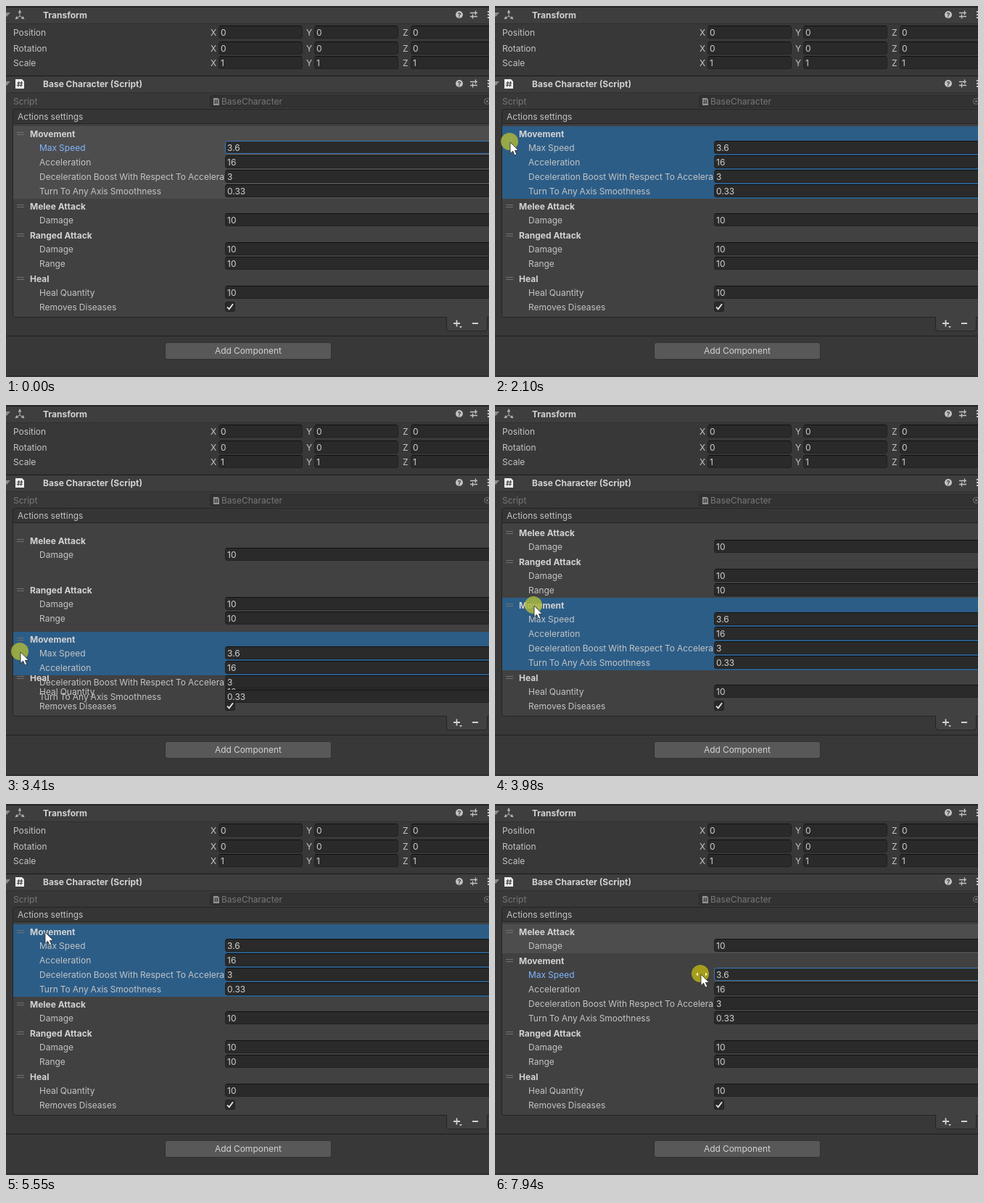
Animation, 666 px wide and 512 px high, one loop 7.99 s. Source, as an HTML page:

```html
<!DOCTYPE html>
<html lang="en">
<head>
<meta charset="utf-8">
<title>Reorderable list</title>
<style>
  html, body { margin: 0; width: 100%; height: 100%; overflow: hidden; background: #383838; }
  svg { display: block; font: 12px Inter, "Open Sans", sans-serif; word-spacing: -.4px; fill: #c4c4c4; user-select: none; }
  .bold { font-weight: 700; word-spacing: 0; fill: #d2d2d2; }
  .value { fill: #d2d2d2; }
  .dim { fill: #787878; }
  .field { fill: #2a2a2a; stroke: #212121; }
  .handle { fill: #717171; }
  .focus .label { fill: #81b4ff; }
  .focus .field { stroke: #3a79bb; }
  .focus .edge { display: none; }
</style>
</head>
<body>
<svg id="stage" width="666" height="512" viewBox="0 0 666 512"></svg>
<script>
const LOOP = 7990, STEP = 46.7, LIST_TOP = 166;
const BLUE = '#2c5d87', GRAY = '#4d4d4d';
const stage = document.getElementById('stage');

function add(parent, tag, attrs = {}, text = '') {
  const node = document.createElementNS('http://www.w3.org/2000/svg', tag);
  for (const key in attrs) node.setAttribute(key, attrs[key]);
  node.textContent = text;
  parent.append(node);
  return node;
}
const rect = (p, x, y, width, height, fill) => add(p, 'rect', { x, y, width, height, fill });
const path = (p, d, attrs) => add(p, 'path', { d, ...attrs });
const label = (p, x, y, text, cls = 'label') => add(p, 'text', { x, y, class: cls }, text);

function field(p, x, y, width, value) {
  add(p, 'rect', { x: x + .5, y: y + .5, width: width - 1, height: 17, rx: 2.5, class: 'field' });
  add(p, 'rect', { x: x + 2, y, width: width - 4, height: 1, fill: '#111', class: 'edge' });
  label(p, x + 3, y + 14, value, 'value');
}

function checkbox(p, x, y) {
  add(p, 'rect', { x: x + .5, y: y + .5, width: 13, height: 13, rx: 2.5, class: 'field' });
  path(p, `M${x + 3} ${y + 7.5}l2.7 2.8l5.3 -7`, { fill: 'none', stroke: '#e8e8e8', 'stroke-width': 1.8 });
}

function componentHeader(y, title) {
  rect(stage, 0, y, 666, 1, '#1a1a1a');
  rect(stage, 0, y + 1, 666, 22, '#3e3e3e');
  rect(stage, 0, y + 23, 666, 1, '#303030');
  path(stage, `M-4 ${y + 8}H6L1 ${y + 14}Z`, { fill: '#8a8a8a' });
  label(stage, 51, y + 16, title, 'bold');

  add(stage, 'circle', { cx: 625, cy: y + 11, r: 5, fill: '#c4c4c4' });
  add(stage, 'text', { x: 625, y: y + 14.5, 'text-anchor': 'middle',
    style: 'font-size:9px;font-weight:700;fill:#3e3e3e' }, '?');
  path(stage, `M640 ${y + 8.5}h10M640 ${y + 13.5}h10M647.5 ${y + 5.5}v6M643.5 ${y + 10.5}v6`,
    { stroke: '#c4c4c4', 'stroke-width': 1.3 });
  for (const dy of [6, 10, 14]) rect(stage, 664, y + dy, 2, 2, '#c4c4c4');
}

function drawPanel() {
  rect(stage, 0, 0, 666, 512, '#383838');

  componentHeader(1, 'Transform');
  path(stage, 'M19 14V8M19 14L14 17M19 14L24 17', { stroke: '#9a9a9a', 'stroke-width': 1.2 });
  path(stage, 'M19 5l2.3 4.5h-4.6ZM12.5 18.2l2-4.2l2.6 3.6ZM25.5 18.2l-2-4.2l-2.6 3.6Z', { fill: '#b4b4b4' });
  [['Position', 27, 0], ['Rotation', 49, 0], ['Scale', 69, 1]].forEach(([name, y, value]) => {
    label(stage, 10, y + 14, name);
    ['X', 'Y', 'Z'].forEach((axis, i) => {
      const x = [293, 425, 558][i];
      label(stage, x - 11, y + 14, axis);
      field(stage, x, y, 116, value);
    });
  });

  componentHeader(96, 'Base Character (Script)');
  path(stage, 'M13 101h9l3 3v10h-12Z', { fill: '#eee' });
  path(stage, 'M17.8 104l-1 7.5M21.5 104l-1 7.5M15.2 106.3h8M14.8 109.3h8', { stroke: '#333', 'stroke-width': 1.1 });
  label(stage, 10, 136, 'Script', 'dim');
  add(stage, 'rect', { x: 281.5, y: 123.5, width: 400, height: 16, rx: 2.5, fill: '#323232', stroke: '#2b2b2b' });
  path(stage, 'M286 127h6l2 2v8h-8Z', { fill: '#929292' });
  path(stage, 'M289 129l-.6 6M291.6 129l-.6 6M287 131h6M287 133.5h6', { stroke: '#333', 'stroke-width': .8 });
  label(stage, 297, 136, 'BaseCharacter', 'dim');
  add(stage, 'circle', { cx: 663.5, cy: 131.5, r: 4, fill: 'none', stroke: '#777' });
  add(stage, 'circle', { cx: 663.5, cy: 131.5, r: 1.5, fill: '#777' });

  const line = { stroke: '#242424' };
  path(stage, 'M607.5 429V445Q607.5 448.5 611 448.5H660Q663.5 448.5 663.5 445V429', { fill: '#414141', ...line });
  path(stage, 'M670 162.5H9.5V426.5Q9.5 429.5 12.5 429.5H670', { fill: '#414141', ...line });
  rect(stage, 608, 429, 55, 1, '#414141');
  path(stage, 'M670 162.5H9.5V145.5Q9.5 142.5 12.5 142.5H670', { fill: '#353535', ...line });
  label(stage, 16, 157, 'Actions settings');
  path(stage, 'M617 438h9M621.5 433.5v9M643 438h8', { stroke: '#d0d0d0', 'stroke-width': 1.8 });
  path(stage, 'M625 442h4l-2 2.5Z', { fill: '#d0d0d0' });

  rect(stage, 0, 455, 666, 1, '#1f1f1f');
  add(stage, 'rect', { x: 219.5, y: 464.5, width: 229, height: 23, rx: 3, fill: '#585858', stroke: '#303030' });
  add(stage, 'text', { x: 334, y: 480, 'text-anchor': 'middle', class: 'value' }, 'Add Component');
  rect(stage, 0, 510, 666, 1, '#2b2b2b');

  const labelColumn = add(stage, 'clipPath', { id: 'label-column' });
  rect(labelColumn, 0, 0, 301, 512);
}

function makeItem(title, rows) {
  const group = add(list, 'g');
  const height = 20 + rows.length * 20;
  const box = rect(group, 10, 0, 656, height, 'none');
  const handle = path(group, 'M15 8h10v1h-10ZM15 11h10v1h-10Z', { class: 'handle' });
  label(group, 33, 15, title, 'bold');
  const rowNodes = rows.map(([name, value], i) => {
    const row = add(group, 'g'), y = 20 + i * 20;
    label(row, 46, y + 14, name).setAttribute('clip-path', 'url(#label-column)');
    if (value === true) checkbox(row, 302, y + 2);
    else field(row, 302, y, 370, value);
    return row;
  });
  return { group, box, handle, height, rowNodes };
}

drawPanel();
const list = add(stage, 'g');
const melee = makeItem('Melee Attack', [['Damage', 10]]);
const ranged = makeItem('Ranged Attack', [['Damage', 10], ['Range', 10]]);
const heal = makeItem('Heal', [['Heal Quantity', 10], ['Removes Diseases', true]]);
const movement = makeItem('Movement', [
  ['Max Speed', 3.6], ['Acceleration', 16],
  ['Deceleration Boost With Respect To Acceleration', 3], ['Turn To Any Axis Smoothness', 0.33]]);

const pointer = add(stage, 'g');
const halo = add(pointer, 'circle', { cx: -1, cy: -1, r: 12, 'fill-opacity': .8 });
const slider = path(pointer, 'M-7 0l3 -2.6v5.2ZM9 0l-3 -2.6v5.2Z', { fill: '#fff6b0' });
path(pointer, 'M0 0V15.5L3.6 12.2L6 18L8.8 16.8L6.4 11.3H11.2Z',
  { fill: '#fff', stroke: '#222', 'stroke-width': .8 });

// Pointer path: time, x, y.
const track = [
  [520, 97, 516], [800, 70, 400], [1100, 32, 230], [1320, 24, 190], [1910, 24, 190],
  [1960, 21, 188], [2580, 21, 188], [2900, 21, 208], [3200, 21, 285], [3363, 20, 334],
  [3410, 20, 341], [3560, 14, 348], [3700, 14, 345], [3920, 54, 277], [4020, 54, 277],
  [4303, 55, 206], [4350, 55, 204], [4700, 54, 177], [5700, 54, 177], [5980, 38, 279],
  [6090, 38, 279], [6300, 15, 276], [6640, 15, 276], [6863, 40, 203], [6920, 41, 202],
  [7300, 40, 166], [7460, 40, 166], [7800, 284, 235]];

function pointerAt(t) {
  const i = track.findIndex(key => key[0] > t);
  if (i < 0) return track[track.length - 1].slice(1);
  if (i === 0) return track[0].slice(1);
  const [t0, x0, y0] = track[i - 1], [t1, x1, y1] = track[i];
  const k = (t - t0) / (t1 - t0);
  return [x0 + (x1 - x0) * k, y0 + (y1 - y0) * k];
}

const between = (t, a, b) => t >= a && t < b;

// Items give way with an exponential approach to each new slot.
const slide = (t, start, moves) => moves.reduce(
  (top, [at, to]) => t < at ? top : to + (top - to) * Math.exp((at - t) / 94), start);

// A dragged item trails the pointer by one step and stays inside the list.
const dragged = (t, grab, max) =>
  Math.min(max, Math.max(LIST_TOP, pointerAt(t - STEP)[1] - grab));

function movementTop(t) {
  if (between(t, 2600, 3650)) return dragged(t, 22, 326);
  if (between(t, 3650, 4000)) return 266;
  if (between(t, 4000, 5550)) return dragged(t, 11, 266);
  return slide(t, 166, [[6820, 206]]);
}

function meleeTop(t) {
  if (between(t, 6640, 7450)) return dragged(t, 11, 266);
  return t >= 7450 ? 166 : slide(t, 266, [[3207, 166], [4290, 266]]);
}

function place(item, top, fill = 'none', dragging = false) {
  item.group.setAttribute('transform', `translate(0 ${Math.round(top)})`);
  item.box.setAttribute('fill', fill);
  item.box.setAttribute('height', dragging ? 60 : item.height);
}

const show = (node, on) => node.setAttribute('visibility', on ? 'visible' : 'hidden');

function render(t) {
  const s = 2620 + Math.floor((t - 2610) / STEP) * STEP;
  const front = t < 6300 ? movement : melee;
  if (list.lastChild !== front.group) list.append(front.group);

  const moveFill = t < 2100 ? GRAY : t < 6300 ? BLUE : 'none';
  const meleeFill = t < 6300 ? 'none' : t < 7890 ? BLUE : GRAY;
  place(movement, movementTop(s), moveFill, between(t, 2620, 3650) || between(t, 4020, 5550));
  place(melee, meleeTop(s), meleeFill, between(t, 6660, 7450));
  place(ranged, slide(s, 306, [[3325, 206], [4230, 306]]));
  place(heal, 366);
  show(movement.handle, !between(t, 2100, 2620));
  movement.rowNodes[0].classList.toggle('focus', t < 420 || t >= 7890);

  const [x, y] = pointerAt(s);
  pointer.setAttribute('transform', `translate(${Math.round(x)} ${Math.round(y)})`);
  pointer.setAttribute('display', t < 560 ? 'none' : 'inline');
  halo.setAttribute('fill', t < 7800 ? '#b2bb38' : '#beb414');
  show(halo, between(t, 2100, 3650) || between(t, 3960, 5550) || between(t, 6300, 7450) || t >= 7890);
  show(slider, t >= 7800);
}

const origin = performance.now();
function tick() {
  render((performance.now() - origin) % LOOP);
  requestAnimationFrame(tick);
}
tick();
</script>
</body>
</html>
```
